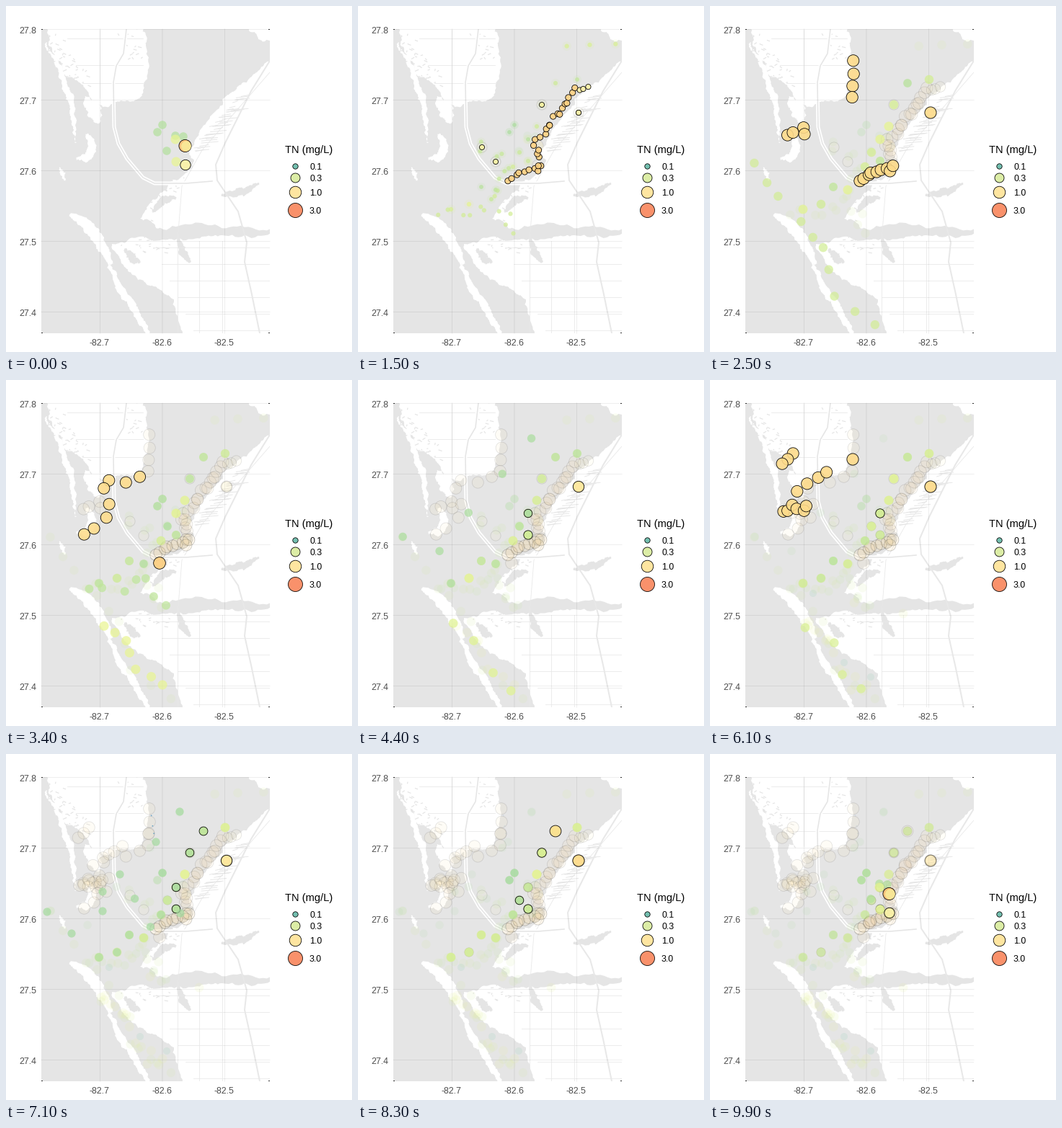
These frames come from a looping animation (480 px wide and 480 px high, 10 s). A matplotlib script:

```python
import numpy as np
import matplotlib.pyplot as plt
from matplotlib.animation import FuncAnimation
from matplotlib.colors import LinearSegmentedColormap
from matplotlib.patches import Polygon, Rectangle

SIZE, DPI = 480, 100
PX = 72 / DPI
FRAMES, INTERVAL, STATES, STEPS = 100, 100, 12, 4
LEFT, TOP, RIGHT, BOTTOM = 49, 32, 366, 454
SEA, LAND, ROAD = "#e5e5e5", "#ffffff", "#e8e8e8"

plt.rcParams["font.family"] = "Liberation Sans"
rng = np.random.default_rng(8)
cmap = LinearSegmentedColormap.from_list("nitrogen", [
    "#3288bd", "#66c2a5", "#a6dba0", "#e6f590",
    "#fff3a8", "#fedb8b", "#fdae61", "#f46d43"])

fig = plt.figure(figsize=(SIZE / DPI, SIZE / DPI), dpi=DPI, facecolor="white")
ax = fig.add_axes([0, 0, 1, 1])
ax.set(xlim=(0, SIZE), ylim=(SIZE, 0))
ax.axis("off")


def along(path, n, spread=0.0):
    """Place n points evenly along a path, with random scatter."""
    path = np.array(path, float)
    steps = np.hypot(*np.diff(path, axis=0).T)
    dist = np.concatenate([[0], np.cumsum(steps)])
    at = np.linspace(0, dist[-1], n)
    pts = np.column_stack([np.interp(at, dist, c) for c in path.T])
    return pts + rng.normal(0, 1, (n, 2)) * spread


# ---- base map ----
panel = Rectangle((LEFT, TOP), RIGHT - LEFT, BOTTOM - TOP, fc=SEA, ec="none")
ax.add_patch(panel)


def rough(points, amount, depth=4):
    """Subdivide a closed outline with random sideways shifts."""
    pts = np.array(points, float)
    for _ in range(depth):
        step = np.roll(pts, -1, axis=0) - pts
        length = np.hypot(*step.T)[:, None]
        shift = np.clip(rng.normal(0, amount, (len(pts), 1)), -0.25, 0.25)
        shift *= np.minimum(1, 14 / np.maximum(length, 1))
        mid = pts + step / 2 + shift * step[:, ::-1] * [-1, 1]
        pts = np.stack([pts, mid], axis=1).reshape(-1, 2)
    return pts


def area(points, color=LAND, amount=0.12):
    patch = Polygon(rough(points, amount), fc=color, ec="none")
    ax.add_patch(patch)
    patch.set_clip_path(panel)


def strip(path, width, color=LAND):
    """A long island or river around a centre line."""
    pts = along(path, 14, 1)
    half = width / 2 * np.sin(np.linspace(0.3, np.pi - 0.3, 14))[:, None]
    side = np.gradient(pts, axis=0)[:, ::-1] * [-1, 1]
    side = side / np.hypot(*side.T)[:, None] * half
    area(np.vstack([pts + side, (pts - side)[::-1]]), color)


def road(path, width=0.8, color=ROAD):
    line, = ax.plot(*np.array(path).T, color=color, lw=width * PX)
    line.set_clip_path(panel)


# western peninsula and its islands
area([(54, 28), (190, 28), (194, 55), (196, 100), (186, 127), (160, 131),
      (134, 140), (118, 128), (104, 108), (78, 92), (64, 62)])
strip([(56, 50), (68, 76), (82, 106), (92, 138), (95, 188)], 8)
strip([(108, 128), (122, 142), (128, 162)], 19)
strip([(98, 212), (112, 211), (121, 196), (113, 176)], 12)
strip([(75, 226), (81, 240)], 6)

# eastern shore with the farmland behind it
area([(372, 72), (345, 94), (320, 115), (300, 130), (270, 171), (254, 200),
      (259, 222), (230, 243), (212, 262), (186, 295), (218, 310),
      (290, 303), (372, 309)])
area([(330, 28), (372, 28), (372, 44), (350, 46)])

# southern mainland and barrier islands
area([(147, 330), (185, 320), (250, 325), (300, 318), (372, 316), (372, 458),
      (246, 458), (233, 407), (209, 390), (183, 380), (160, 357)])
strip([(88, 288), (116, 306), (130, 328), (146, 358)], 17)
strip([(143, 358), (160, 395), (180, 424), (198, 458)], 11)
for inlet in ([(203, 286), (218, 268), (236, 266)],
              [(166, 338), (176, 352), (186, 356)],
              [(238, 322), (245, 340), (257, 356)],
              [(300, 262), (330, 258), (352, 247)]):
    strip(inlet, 10, SEA)

# creeks and canals near the shores
for path, spread, n in (([(62, 45), (112, 120)], 7, 45),
                        ([(168, 40), (185, 75)], 6, 14),
                        ([(250, 225), (190, 290)], 9, 40),
                        ([(175, 330), (230, 335)], 7, 20)):
    for x, y in along(path, n, spread):
        dx, dy = rng.uniform(-4, 4, 2)
        road([(x, y), (x + dx, y + dy / 2)], 1.2, SEA)
for x, y in along([(260, 200), (325, 125)], 40, 3):
    road([(x, y), (x + rng.uniform(5, 25), y - 2)], 0.9, SEA)

# roads
for y, x0 in zip(range(335, 454, 23), range(205, 265, 11)):
    road([(x0, y), (RIGHT, y)])
for x in (238, 268, 300):
    road([(x, 326), (x, BOTTOM)])
for y in (45, 82, 107):
    road([(70 + y / 3, y), (190, y)])
road([(130, 33), (130, 128)])
road([(366, 92), (272, 200), (244, 250), (238, 326)])
road([(366, 76), (340, 118), (304, 190), (291, 220), (293, 242), (322, 285),
      (334, 328), (331, 355), (341, 400), (352, 454)], 2)
bridge = [(167, 32), (163, 66), (153, 83), (149, 106), (150, 168), (156, 191),
          (168, 212), (190, 238), (206, 246), (250, 246), (286, 243)]
road(bridge, 5, LAND)
road(bridge, 1.6, SEA)

# grid, axis labels and corners
grid = dict(color="black", alpha=0.065, lw=PX, zorder=3, snap=False)
tick = dict(size=12.4 * PX, color="#4d4d4d", va="center_baseline")
for i in range(3):
    x = 130.5 + 86.5 * i
    ax.plot([x, x], [TOP, BOTTOM], **grid)
    ax.text(x - 1, 466.5, f"{-82.7 + i / 10:.1f}", ha="center", **tick)
for i in range(5):
    y = 32.5 + 98 * i
    ax.plot([LEFT, RIGHT], [y, y], **grid)
    ax.text(42.5, y + 0.5, f"{27.8 - i / 10:.1f}", ha="right", **tick)
for x in (LEFT, RIGHT - 2):
    for y in (TOP, BOTTOM - 1):
        ax.add_patch(Rectangle((x, y), 2, 1, fc="#333333", ec="none", zorder=3))


def area_pt(radius):
    return (2 * np.asarray(radius) * PX) ** 2


# ---- legend ----
ax.text(387, 198.3, "TN (mg/L)", size=14.67 * PX, va="center_baseline")
for y, radius, color, label in ((221.5, 3.7, "#74c0b0", "0.1"),
                                (238, 6.5, "#dceda6", "0.3"),
                                (257.8, 8.3, "#fee5a0", "1.0"),
                                (283.3, 10, "#f9916b", "3.0")):
    ax.scatter(401, y, s=area_pt(radius), c=color, ec="black", lw=0.8 * PX)
    ax.text(421, y + 0.7, label, size=12.4 * PX, va="center_baseline")


# ---- samples: rows of x, y, level, outlined ----
def dots(level, points, ringed=0):
    points = np.array(points, float)
    extra = np.tile([level, ringed], (len(points), 1))
    return np.hstack([points, extra])


def rings(level, points):
    return dots(level, points, 1)


SITES = [(129, 282), (154, 275), (171, 251), (191, 255), (215, 223), (224, 203),
         (236, 215), (236, 185), (248, 167), (255, 137), (274, 107), (304, 102)]
WEST_BAY = [(57, 219), (91, 249), (134, 218), (158, 167), (208, 122), (241, 80)]
SOUTH_BAY = [(131, 340), (165, 357), (180, 400), (220, 426)]
LOWER_BAY = [(115, 286), (158, 294), (188, 270), (218, 315)]
MID_BAY = [(210, 175), (217, 165)]
EAST = [(306, 148)]
shore = along([(209, 241), (226, 232), (255, 224), (247, 194), (264, 167),
               (282, 143), (301, 118), (320, 112)], 32, 2)


def sites(ringed=()):
    rows = dots(0, SITES)
    rows[:, 2] = rng.uniform(1.1, 2.1, len(rows))
    rows[list(ringed), 3] = 1
    return rows


states = [
    [dots(1.2, MID_BAY + [(235, 180), (246, 181), (223, 201)]),
     dots(2.1, [(235, 185), (236, 216)]),
     rings(4.6, [(248.5, 194)]), dots(2.7, [(250, 194.5)]),
     rings(2.9, [(249, 220.5)])],
    [sites(), dots(1.1, MID_BAY), dots(1.8, along([(287, 54), (356, 54)], 3, 2)),
     dots(1.5, along([(165, 187), (212, 217), (188, 270)], 9, 5)),
     rings(2.8, [(172, 196), (191, 216), (255, 137)] + EAST)],
    [rings(4.2, shore[:-3]), rings(3, shore[-3:]), rings(3, EAST),
     dots(1.7, along(LOWER_BAY, 11, 6))],
    [sites(), rings(4, shore[:9]), rings(4, EAST),
     rings(4, along([(198, 77), (198, 126)], 4, 1)),
     rings(4, along([(112, 181), (133, 173)], 4, 4)),
     dots(1.7, along([(57, 220), (142, 310), (165, 387), (223, 444)], 10, 6))],
    [sites(), rings(3.9, along([(187, 140), (136, 141), (139, 195), (108, 218)], 8, 2)),
     rings(4.3, [(213, 254)]), dots(1.2, MID_BAY),
     dots(1.4, along(LOWER_BAY, 7, 3)), dots(2.1, along(SOUTH_BAY, 7, 3))],
    [sites((6, 7)), dots(1.1, along(WEST_BAY, 5, 2)), rings(3.5, EAST),
     dots(1.9, along(SOUTH_BAY, 4, 5))],
    [sites((5, 6)), rings(4.3, along([(124, 177), (127, 194)], 3, 0.5)),
     rings(3.9, [(114, 184)]), rings(3.6, EAST), dots(1.2, MID_BAY),
     dots(0.3, [(143, 296), (186, 392), (223, 412)]),
     dots(2.2, along([(136, 334), (161, 357)], 3, 2)),
     dots(2, [(196, 430), (200, 309), (268, 324)])],
    [sites((7,)), rings(4, along([(114, 103), (101, 117)], 3, 1)),
     rings(4, along([(118, 154), (160, 130)], 4, 3)),
     rings(4, along([(101, 183), (134, 177)], 6, 2)),
     rings(4, [(198, 110)] + EAST), dots(1.8, along(SOUTH_BAY, 4, 4))],
    [sites((6, 7, 9, 10)), dots(1, WEST_BAY + MID_BAY[1:]),
     dots(1, along([(134, 191), (180, 201), (200, 240), (242, 221)], 4)),
     dots(-4.8, along([(201, 87), (205, 110)], 3, 1)), rings(3.5, EAST)],
    [sites((1, 6, 7)), rings(4, EAST)],
    [sites((5, 6, 9)), dots(1, MID_BAY), rings(3.8, SITES[10:11]), rings(4, EAST)],
    [sites((6,)), rings(3.9, EAST),
     rings(5, [(222, 234), (239, 221), (253, 187), (271, 156)])],
]
states = [np.vstack(parts) for parts in states]
starts = np.round(5.4 + 8.4 * np.arange(STATES) - 0.012 * np.arange(STATES) ** 2)
starts = np.minimum(starts, FRAMES - STEPS + 1)

shadows = ax.scatter([], [], zorder=4)
live = ax.scatter([], [], zorder=5)


def fill(layer, rows, scale, dot_alpha, ring_alpha, edge_alpha):
    """Put sample rows into a scatter layer at the given scale."""
    x, y, level, ringed = rows.T
    face = cmap((level + 1) / 7)
    face[:, 3] = np.where(ringed == 1, ring_alpha, dot_alpha)
    edge = np.zeros((len(rows), 4))
    edge[:, 3] = ringed * edge_alpha
    layer.set_offsets(np.column_stack([x, y]))
    layer.set_sizes(area_pt((4.8 + 0.82 * level) * scale))
    layer.set_facecolor(face)
    layer.set_edgecolor(edge)
    layer.set_linewidths(ringed * 0.8 * PX)


def draw(frame):
    passed = int(np.sum(starts <= frame))
    progress = 1.0
    if passed:
        progress = min(1, (frame - starts[passed - 1] + 1) / STEPS)
    rows = states[passed % STATES]
    scale = np.full(len(rows), progress)
    if progress < 1:
        old = states[passed - 1]
        rows = np.vstack([old, rows])
        scale = np.concatenate([np.full(len(old), 1 - progress), scale])
    past = np.vstack(states[:passed]) if passed else np.empty((0, 4))
    fill(shadows, past, 1, 0.12, 0.07, 0.11)
    fill(live, rows, scale, 0.72, 0.9, 1)
    return shadows, live


anim = FuncAnimation(fig, draw, frames=FRAMES, interval=INTERVAL,
                     init_func=lambda: draw(0), repeat=True, repeat_delay=0)
plt.show()
```
